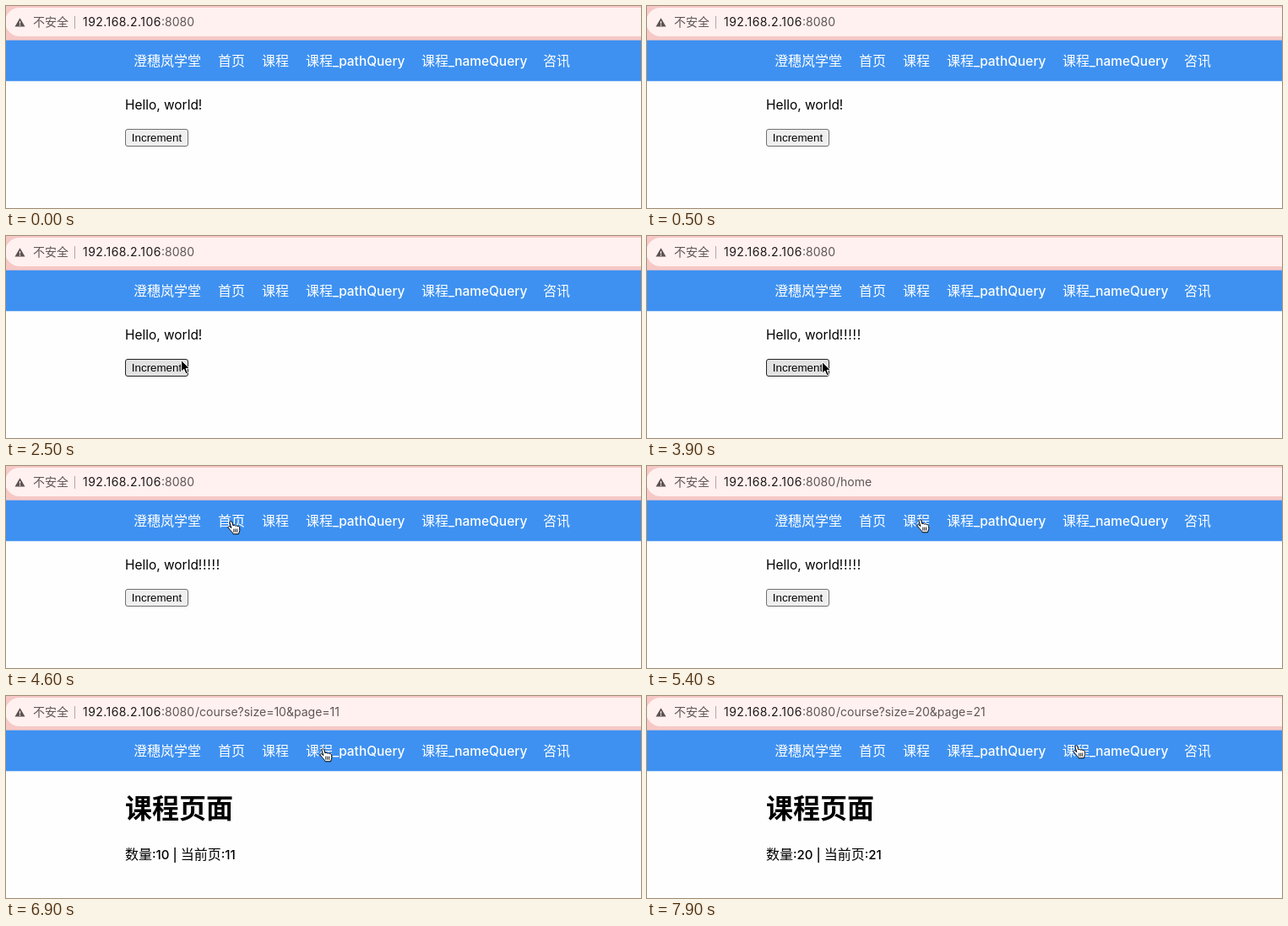
Recreate the animation shown at these times as an HTML page. Size 752 by 240 pixels, loop 8000 ms.

```html
<!DOCTYPE html>
<html lang="zh-CN">
<head>
<meta charset="utf-8">
<title>课程页面</title>
<style>
  html, body { margin: 0; width: 100%; height: 100%; overflow: hidden; background: #fefefe; }
  #stage {
    position: relative; width: 752px; height: 240px; overflow: hidden; color: #000;
    font: 16px/20px Inter, "Noto Sans CJK SC", "Noto Sans CJK", sans-serif;
  }
  #stage * { position: absolute; white-space: pre; }
  #stage i { position: static; font-style: normal; font-size: .965em; line-height: 0; }

  .chrome { width: 752px; height: 40px; background: #f6c8c6; border-bottom: 1px solid #c4b6d0; }
  .pill { left: -1px; top: 2px; width: 780px; height: 34px; border-radius: 17px; background: #fff1ef; }
  .url { top: 9px; font-size: 14px; color: #5f5656; }
  .host { color: #1d1819; letter-spacing: .45px; }
  .sep { left: 81px; top: 12px; width: 1px; height: 15px; background: #b5a5a4; }

  nav {
    top: 41px; width: 752px; height: 48px; background: #3e91f1; color: #fff;
    font-weight: 500; border-bottom: 1px solid #c9dffa;
  }
  nav span { top: 14px; }

  .line { left: 141px; }
  h1 { left: 141px; top: 114px; margin: 0; font-size: 32px; line-height: 40px; }
  #bangs { position: static !important; letter-spacing: .8px; }
  #info { top: 178px; font-weight: 500; }
  #info i { font-size: .94em; }
  button {
    left: 141px; top: 146px; width: 75px; height: 21px; padding: 0; box-sizing: border-box;
    border: 1px solid #6f6f6f; border-radius: 3px; background: #efefef; color: #000;
    font: 13.333px/19px "Liberation Sans", Arial, sans-serif;
  }
  button.hover { border-color: #222; background: #e2e2e2; }
  #cursor { left: 0; top: 0; width: 20px; height: 22px; overflow: visible; }
</style>
</head>
<body>
<div id="stage">
  <div class="chrome"></div>
  <div class="pill"></div>
  <svg style="left:10px;top:14px" width="13" height="11" viewBox="0 0 13 11">
    <path d="M6.5 .3 12.5 10.6H.5z" fill="#5b5252"/>
    <path d="M6.5 4v3.2M6.5 8.1v1.3" stroke="#fff1ef" stroke-width="1.2"/>
  </svg>
  <span class="url" style="left:32px">不安全</span>
  <div class="sep"></div>
  <span class="url host" style="left:91px">192.168.2.106</span>
  <span class="url" style="left:184px">:8080</span>
  <span class="url" style="left:224px" id="path"></span>

  <nav>
    <span style="left:151px">澄穗岚学堂</span>
    <span style="left:251px">首页</span>
    <span style="left:303px">课程</span>
    <span style="left:355px">课程<i>_pathQuery</i></span>
    <span style="left:492px">课程<i>_nameQuery</i></span>
    <span style="left:636px">咨讯</span>
  </nav>

  <div id="home">
    <span class="line" style="top:107px"><i>Hello, world<span id="bangs"></span></i></span>
    <button id="button">Increment</button>
  </div>
  <div id="course">
    <h1>课程页面</h1>
    <span class="line" id="info">数量<i>:<b id="size"></b> | </i>当前页<i>:<b id="page"></b></i></span>
  </div>

  <svg id="cursor" viewBox="0 0 20 22">
    <path id="arrow" d="M.5 .5V14.2L3.7 11.3 6 16.7 8.4 15.7 6.1 10.4H10.4Z"
      fill="#000" stroke="#fff" stroke-linejoin="round"/>
    <g id="hand" stroke="#000" stroke-linejoin="round" stroke-linecap="round">
      <path fill="#fff" d="M1 1.6C1.6.2 3.4.4 3.8 1.9L5 6C5.4 5 7.2 5 7.6 6.3 8.3 5.4 9.8 5.6 10.2 6.8
        11.3 6.2 12.5 6.9 12.6 8.2L12.8 11.5C12.8 13 11.6 14 11.5 15.8H5.1C4.8 14 2.4 12.4 1 10.4
        L-.9 8.2C-1.6 7 .2 6.2 1.3 7.2L2.6 8.4Z"/>
      <path fill="none" stroke-width=".9" d="M5.8 10v3.4M7.8 10v3.4M9.8 10v3.4"/>
    </g>
  </svg>
</div>
<style>
  #stage #info b { position: static; font-weight: inherit; }
</style>
<script>
  const LOOP = 8000;
  const $ = id => document.getElementById(id);
  const show = (id, on) => { $(id).style.display = on ? '' : 'none'; };

  // Pointer stops: time, x, y
  const stops = [
    [500, 300, 242], [900, 226, 138], [1150, 211, 63], [1350, 211, 63], [2050, 207, 147],
    [3400, 207, 147], [3600, 207, 149], [3950, 207, 149], [4400, 264, 65], [4950, 264, 65],
    [5300, 321, 63], [6200, 321, 63], [6650, 373, 62], [7250, 373, 62], [7900, 506, 58], [LOOP, 506, 58]
  ];
  const clicks = [2700, 3000, 3300, 3600];
  const links = [[251, 283], [303, 335], [355, 472], [492, 616], [636, 668]];
  const routes = [
    [0, ''], [4700, '/home'], [5700, '/course', 10, 11], [7100, '/course', 20, 21]
  ];

  function pointer(t) {
    const k = stops.findIndex(s => s[0] > t);
    if (k < 1) return null;
    const [a, b] = [stops[k - 1], stops[k]];
    const u = (t - a[0]) / (b[0] - a[0]);
    const e = u * u * (3 - 2 * u);
    return { x: a[1] + (b[1] - a[1]) * e, y: a[2] + (b[2] - a[2]) * e };
  }

  function draw(t) {
    const [, path, size, page] = routes.filter(r => r[0] <= t).pop();
    $('path').textContent = path + (size ? `?size=${size}&page=${page}` : '');
    show('home', !size);
    show('course', size);
    $('size').textContent = size;
    $('page').textContent = page;
    $('bangs').textContent = '!'.repeat(1 + clicks.filter(c => c <= t).length);

    const p = pointer(t);
    show('cursor', p);
    const { x, y } = p || { x: 0, y: 0 };
    const onLink = y > 50 && y < 80 && links.some(([l, r]) => x >= l && x <= r);
    show('hand', onLink);
    show('arrow', !onLink);
    $('cursor').style.transform = `translate(${x}px, ${y}px)`;
    $('button').classList.toggle('hover', x > 141 && x < 216 && y > 145 && y < 167);
  }

  function tick() {
    draw(performance.now() % LOOP);
    requestAnimationFrame(tick);
  }
  tick();
</script>
</body>
</html>
```
